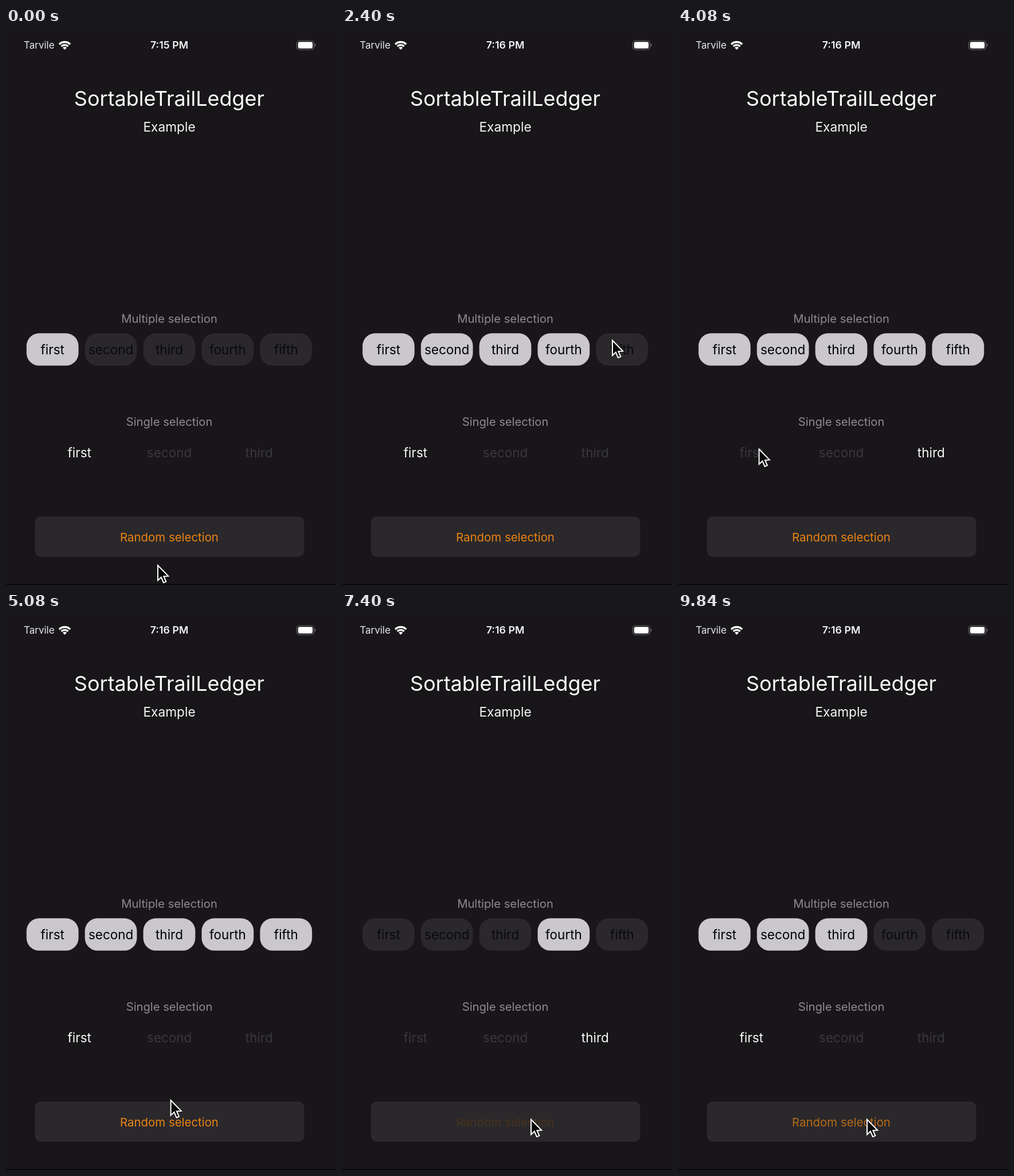
An HTML page with a canvas for the animation above (9.88 s loop, 576 by 973 pixels).

```html
<!DOCTYPE html>
<html lang="en">
<head>
<meta charset="utf-8">
<title>Selection demo</title>
<style>
  html, body { margin: 0; width: 100%; height: 100%; overflow: hidden; background: #181619; }
  canvas { display: block; width: 576px; height: 973px; }
</style>
</head>
<body>
<canvas id="stage"></canvas>
<script>
const W = 576, H = 973, LOOP = 9880, MID = 285;
const FADE = 200, HOLD = 80, PRESS = 150, RECOVER = 650;
const canvas = document.getElementById('stage');
const dpr = window.devicePixelRatio || 1;
canvas.width = Math.round(W * dpr);
canvas.height = Math.round(H * dpr);
const ctx = canvas.getContext('2d');

const PILLS = ['first', 'second', 'third', 'fourth', 'fifth'];
const ITEMS = PILLS.slice(0, 3);
// Selected pills and the selected item after each press of the button
const ROLLS = ['24-2', '135-1', '235-2', '4-3', '145-2', '23-1', '125-3', '34-2', '123-1'];

// Every tap: time, pointer tip, and the selection it leaves behind
const taps = [{ t: -40, x: 265, y: 938, pills: '1', item: 1 }];
for (let i = 1; i < 5; i++) {
  taps.push({ t: 730 + 430 * i, x: 96 + 94 * i, y: 545, pills: '12345'.slice(0, i + 1), item: 1 });
}
[2, 3, 1].forEach((item, i) => {
  taps.push({ t: 3060 + 520 * i, x: -7.5 + 149 * item, y: 735, pills: '12345', item });
});
const rolls = ROLLS.map((roll, i) => {
  const [pills, item] = roll.split('-');
  return { t: 5560 + 480 * i, x: 330, y: 884, pills, item: +item };
});
taps.push(...rolls);

const clamp = v => Math.max(0, Math.min(1, v));
const lerp = (a, b, k) => a + (b - a) * k;
const ease = k => k * k * (3 - 2 * k);
const mix = (a, b, k) => `rgb(${a.map((v, i) => Math.round(lerp(v, b[i], k))).join(',')})`;

function text(str, x, y, size, color, weight = 400, align = 'center') {
  ctx.font = `${weight} ${size}px Inter, Roboto, sans-serif`;
  ctx.textAlign = align;
  ctx.fillStyle = color;
  ctx.fillText(str, x, y);
}

function box(x, y, w, h, r, color) {
  ctx.beginPath();
  ctx.roundRect(x, y, w, h, r);
  ctx.fillStyle = color;
  ctx.fill();
}

function wifi(x, y) {
  const a = -Math.PI * 0.75, b = -Math.PI * 0.25;
  ctx.fillStyle = '#fff';
  for (let i = 0; i < 3; i++) {
    ctx.beginPath();
    ctx.arc(x, y, 5 + 5.1 * i, a, b);
    ctx.arc(x, y, i && 1.6 + 5.1 * i, b, a, true);
    ctx.fill();
  }
}

function battery(x, y) {
  ctx.beginPath();
  ctx.roundRect(x, y, 30, 16, 4.8);
  ctx.strokeStyle = '#666468';
  ctx.lineWidth = 1.2;
  ctx.stroke();
  box(x + 2.3, y + 2.3, 25.4, 11.4, 3, '#fff');
  box(x + 31.3, y + 5.5, 1.8, 5, [0, 2, 2, 0], '#666468');
}

function selectionAt(t) {
  const i = taps.findLastIndex(tap => tap.t <= t);
  const now = taps[i], before = taps[Math.max(0, i - 1)];
  const k = ease(clamp((t - now.t) / FADE));
  return test => lerp(+test(before), +test(now), k);
}

// Button label: dim while pressed, then slowly back to full colour
function labelLevel(t) {
  if (rolls.some(r => t >= r.t - PRESS && t < r.t)) return 0;
  const last = rolls.findLast(r => r.t <= t);
  return last ? clamp((t - last.t) / RECOVER) : 1;
}

// The pointer rests around each tap and glides in between
function pointer(t) {
  const i = taps.findLastIndex(tap => tap.t <= t);
  const from = taps[i], to = taps[i + 1] || from;
  const k = ease(clamp((t - from.t - HOLD) / (to.t - from.t - 2 * HOLD)));
  ctx.save();
  ctx.translate(lerp(from.x, to.x, k), lerp(from.y, to.y, k));
  ctx.beginPath();
  ctx.lineTo(0, 0.8);
  ctx.lineTo(0, 27);
  ctx.lineTo(5.9, 21.5);
  ctx.lineTo(10, 31);
  ctx.lineTo(14.4, 29.1);
  ctx.lineTo(10.4, 19.9);
  ctx.lineTo(18.2, 19.4);
  ctx.closePath();
  ctx.fillStyle = '#050505';
  ctx.fill();
  ctx.strokeStyle = '#fff';
  ctx.lineWidth = 2;
  ctx.stroke();
  ctx.restore();
}

function draw(t) {
  ctx.setTransform(canvas.width / W, 0, 0, canvas.height / H, 0, 0);
  ctx.fillStyle = '#181619';
  ctx.fillRect(0, 0, W, H);
  ctx.fillStyle = '#050505';
  ctx.fillRect(0, 971.5, W, 1.5);

  text('Tarvile', 31, 36, 17, '#e9e8ea', 400, 'left');
  wifi(102.5, 38);
  text(t < 1920 ? '7:15 PM' : '7:16 PM', MID, 36.2, 17.8, '#f4f3f5', 600);
  battery(507.5, 22);

  text('SortableTrailLedger', MID, 135.5, 36, '#fafafa');
  text('Example', MID, 181, 22.7, '#f7f7f7');
  text('Multiple selection', MID, 515, 20.2, '#8d8b8f');
  text('Single selection', MID, 694.5, 20.2, '#8d8b8f');

  const level = selectionAt(t);
  PILLS.forEach((name, i) => {
    const x = MID + 101.9 * (i - 2);
    const k = level(tap => tap.pills.includes(i + 1));
    box(x - 45.4, 533.3, 90.8, 56.5, 22, mix([42, 40, 43], [202, 200, 204], k));
    text(name, x, 570, 22.5, mix([10, 9, 11], [0, 0, 0], k));
  });
  ITEMS.forEach((name, i) => {
    const k = level(tap => tap.item === i + 1);
    text(name, MID + 156.8 * (i - 1), 750, 22.5, mix([57, 55, 59], [248, 248, 248], k));
  });

  box(50.5, 853.5, 470, 70, 10, '#2a282b');
  text('Random selection', MID, 896.5, 20.4, mix([72, 51, 31], [235, 133, 18], labelLevel(t)));
  pointer(t);
}

const start = performance.now();
function tick() {
  draw((performance.now() - start) % LOOP);
  requestAnimationFrame(tick);
}
tick();
</script>
</body>
</html>
```
